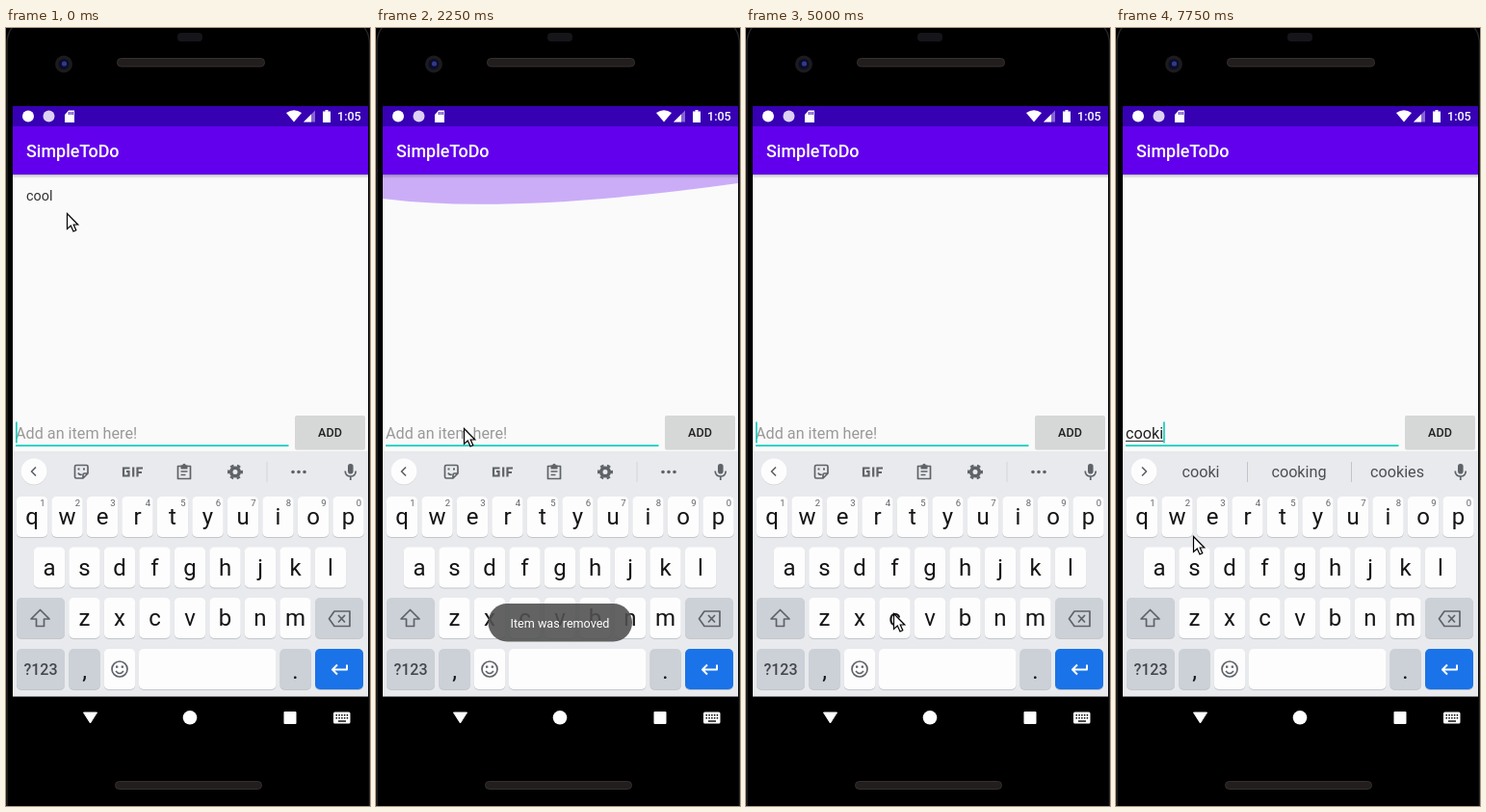
An HTML page that plays this animation: 378 px wide and 807 px high, repeating every 8 s.

```html
<!DOCTYPE html>
<html lang="en">
<head>
<meta charset="utf-8">
<title>To-do list</title>
<style>
html, body { margin: 0; width: 100%; height: 100%; overflow: hidden; background: #000; }
svg { display: block; width: 378px; height: 807px; font-family: Roboto, sans-serif; }
.mid { text-anchor: middle; }
.line { fill: none; stroke: #5f6368; stroke-width: 1.7; stroke-linejoin: round; }
.grey { fill: #5f6368; }
.key { font-size: 24px; fill: #151515; text-anchor: middle; }
.digit { font-size: 9.5px; fill: #5f6368; text-anchor: middle; }
.word { font-size: 16.2px; fill: #4c4f53; text-anchor: middle; }
#glow { transform-origin: 0 152px; }
</style>
</head>
<body>
<svg viewBox="0 0 378 807">
  <defs>
    <linearGradient id="shade" x2="0" y2="1">
      <stop stop-color="#000" stop-opacity=".24"/>
      <stop offset="1" stop-color="#000" stop-opacity="0"/>
    </linearGradient>
  </defs>

  <!-- phone body -->
  <rect width="378" height="807"/>
  <rect x="1" y="-12" width="376.5" height="850" rx="28" fill="none" stroke="#272727" stroke-width="1.4"/>
  <rect x="178" y="5" width="26" height="9" rx="4" fill="#15151a"/>
  <rect x="115.500" y="31.500" width="153" height="8.500" rx="4" fill="#211e1d" stroke="#35302e"/>
  <rect x="113.500" y="781.500" width="152" height="8" rx="4" fill="#211e1d" stroke="#35302e"/>
  <circle cx="60" cy="37.500" r="9" fill="#1b1b20"/>
  <circle cx="60" cy="37.500" r="5.500" fill="#0c0d25"/>
  <circle cx="60.500" cy="37" r="2.600" fill="#2d3a92"/>

  <!-- app -->
  <rect x="7" y="152" width="369" height="288" fill="#fafafa"/>
  <path id="glow" d="M7 152V177Q140 194 376 161V152Z" fill="#6200ee" fill-opacity=".31"/>
  <rect x="7" y="152" width="369" height="4" fill="url(#shade)"/>
  <rect x="7" y="81" width="369" height="21" fill="#3700b3"/>
  <rect x="7" y="102" width="369" height="50" fill="#6200ee"/>
  <text x="21" y="134" font-size="17.960" font-weight="500" fill="#fff">SimpleToDo</text>

  <!-- status bar -->
  <g fill="#fff">
    <circle cx="23" cy="91.500" r="6"/>
    <circle cx="44.500" cy="91.500" r="6" fill="#ddd2f4"/>
    <path d="M61 90L65 85.500H71V98H61Z"/>
    <path d="M65.500 87v3M67.500 87v3M69.500 87v3" stroke="#3700b3"/>
    <path d="M291 88Q299 82.500 307 88L299 97.500Z"/>
    <path d="M309 97.500L321 85.500V97.500Z" opacity=".4"/>
    <path d="M309 97.500L317 89.500V97.500Z"/>
    <path d="M329 86.500h2.500v-1.500h3v1.500H337V98H329Z"/>
    <text x="344" y="96.300" font-size="12.570" font-weight="500">1:05</text>
  </g>

  <text id="item" x="21" y="179.300" font-size="14.400" fill="#323232">cool</text>

  <!-- input row -->
  <text id="hint" x="10" y="426.300" font-size="16.200" fill="#999">Add an item here!</text>
  <text id="typed" x="10" y="426.300" font-size="16.200" fill="#222"></text>
  <rect id="under" x="10" y="428" height="1" fill="#333"/>
  <rect x="10" y="432.300" width="283.500" height="1.800" fill="#17cdbb"/>
  <rect id="caret" y="408.500" width="1.700" height="22" fill="#17cdbb"/>
  <rect x="300" y="403" width="73" height="34.800" rx="2" fill="#000" opacity=".13"/>
  <rect x="300" y="402" width="73" height="35" rx="2" fill="#d6d7d7"/>
  <text class="mid" x="336.500" y="424" font-size="12.570" font-weight="500" fill="#222">ADD</text>

  <!-- keyboard -->
  <rect x="7" y="439" width="369" height="254.500" fill="#e8eaed"/>
  <circle cx="29" cy="460.800" r="13.500" fill="#d2d4d7"/>
  <circle cx="29" cy="460" r="13.500" fill="#fdfdfd"/>
  <path id="chevron" class="line" d="M31 455.500L26.500 460L31 464.500"/>
  <g id="tools">
    <path class="line" d="M73 453.500H83.500Q85 453.500 85 455V462L80 467H73Q71.500 467 71.500 465.500V455Q71.500 453.500 73 453.500ZM85 462H81.500Q80 462 80 463.500V467M74.800 461.500Q76.500 464 78.700 463"/>
    <path class="grey" d="M74.500 456.500h2v2h-2zM80 456.500h2v2h-2z"/>
    <path class="line" stroke-width="2" style="stroke-width:2.200;stroke-linejoin:miter" d="M128.500 456.500H122V464.500H127.500V460H125M132.200 455.500V465.500M136.500 465.500V456.500H142M136.500 461H141"/>
    <path class="line" d="M178.500 454.500H191.500V467.500H178.500ZM181.500 460H188.500M181.500 463.500H186.500"/>
    <path class="grey" d="M181.500 453.500H183Q185 450 187 453.500H188.500V457.500H181.500Z"/>
    <circle class="line" cx="238" cy="460.500" r="4.300" style="stroke-width:3.600"/>
    <circle class="line" cx="238" cy="460.500" r="6.800" style="stroke-width:2.400" stroke-dasharray="3.560" stroke-dashoffset="1.780"/>
    <path d="M271 450V471" stroke="#d2d4d8"/>
    <g class="grey"><circle cx="298" cy="460.500" r="1.800"/><circle cx="304" cy="460.500" r="1.800"/><circle cx="310" cy="460.500" r="1.800"/></g>
  </g>
  <g id="words">
    <path d="M136.500 450V471M244.500 450V471" stroke="#c2c5c9"/>
    <text class="word" x="88" y="466.300"></text>
    <text class="word" x="190" y="466.300"></text>
    <text class="word" x="292" y="466.300"></text>
  </g>
  <rect class="grey" x="355" y="452" width="5.600" height="10.500" rx="2.800"/>
  <path class="line" d="M352.200 459.500Q352.500 465 357.800 465Q363 465 363.300 459.500M357.800 465V469"/>
  <g id="keys"></g>
  <path class="line" d="M35.500 603.500L26 613H31.500V620.500H39.500V613H45Z"/>
  <path class="line" d="M341 605H357V620.500H341L335.500 612.700ZM345 609L352 616.500M352 609L345 616.500"/>
  <circle class="line" cx="118" cy="665" r="8"/>
  <path class="line" d="M114 667Q118 672 122 667"/>
  <path class="grey" d="M114 661.500h2.300v2.300h-2.300zM119.700 661.500h2.300v2.300h-2.300z"/>
  <path class="line" style="stroke:#fff;stroke-width:2" d="M354 660.500V665.500H339.500M344 660.500L339 665.500L344 670.500"/>

  <!-- navigation -->
  <g fill="#fff">
    <path d="M80.500 710H94.500L87.500 721Z" stroke="#fff" stroke-linejoin="round"/>
    <circle cx="191" cy="715.300" r="7.300"/>
    <rect x="288.500" y="709" width="13" height="13" rx="1"/>
    <rect x="340" y="709.500" width="17.500" height="12" rx="1.500"/>
    <path d="M342.500 712.800H356M342.500 715.800H356" stroke="#000" stroke-width="1.500" stroke-dasharray="1.500 1.300"/>
    <path d="M345 719H353" stroke="#000" stroke-width="1.400"/>
  </g>

  <g id="toast">
    <rect x="116.500" y="597" width="149.500" height="39.500" rx="19.700" fill="#505050" fill-opacity=".89"/>
    <text class="mid" x="191" y="621.800" font-size="12.570" fill="#fff">Item was removed</text>
  </g>
  <path id="pointer" d="M.5 .5V16.500L4.300 13L7 19L9.800 17.800L7.200 12H11.800Z" fill="#fff" stroke="#000" stroke-width="1.200"/>
</svg>
<script>
const $ = id => document.getElementById(id);

// keyboard
let keys = "";
const cap = (x, y, w, fill = "#fdfdfd") => {
  keys += `<rect x="${x}" y="${y + 1}" width="${w}" height="42" rx="5" fill="#c3c6ca"/>
    <rect x="${x}" y="${y}" width="${w}" height="42" rx="5" fill="${fill}"/>`;
};
const label = (cls, x, y, text, more = "") => {
  keys += `<text class="${cls}" x="${x}" y="${y}" ${more}>${text}</text>`;
};
const pitch = 36.5, soft = "#ccd0d7";
[["qwertyuiop", 27, 486], ["asdfghjkl", 45, 538.5], ["zxcvbnm", 81.5, 591]].forEach(([row, x0, y], r) => {
  [...row].forEach((ch, i) => {
    const x = x0 + i * pitch;
    cap(x - 16.2, y, 32.4);
    label("key", x, y + 29, ch);
    if (!r) label("digit", x + 11, y + 10.3, (i + 1) % 10);
  });
});
cap(11, 591, 50, soft);
cap(321, 591, 50, soft);
cap(11, 644, 50, soft);
cap(65.3, 644, 32.4, soft);
cap(101.8, 644, 32.4);
cap(138, 644, 142.5);
cap(284.5, 644, 32.4, soft);
cap(321, 644, 50, "#1a73e8");
label("key", 36, 671, "?123", 'style="font-size:16px;font-weight:500;fill:#44474b"');
label("key", 81.5, 674.5, ",");
label("key", 300.5, 675, ".");
$("keys").innerHTML = keys;

// timelines: [start ms, value...]
const pointer = [
  [0, 63, 192], [250, 57, 187], [500, 49, 180], [750, 44, 176],
  [1750, 56, 215], [2000, 78, 340], [2250, 91, 415],
  [3250, 105, 465], [3500, 115, 502], [3750, 134, 560], [4000, 148, 598], [4250, 153, 607],
  [5500, 318, 514], [6500, 308, 545], [6750, 300, 571],
  [7000, 288, 540], [7250, 282, 514], [7500, 170, 525], [7750, 80, 527]
];
const item = [[0, 1], [1500, .58], [1750, 0]];
const toast = [[0, 0], [1500, .22], [1750, 1], [3750, .45], [4000, 0]];
const glow = [[0, 0, 1], [2000, .6, .6], [2250, 1, 1], [2500, .4, .7], [2750, 0, 1]];
const typing = [[0, ""], [5250, "c"], [5750, "co"], [6000, "coo"], [6750, "cook"], [7250, "cooki"]];
const guesses = {
  c: ["c", "can", "come"], co: ["co", "come", "could"], coo: ["coo", "cool", "caoo"],
  cook: ["cook", "cooking", "cookies"], cooki: ["cooki", "cooking", "cookies"]
};
const at = (line, t) => line.filter(p => p[0] <= t).pop().slice(1);
const wordTexts = $("words").querySelectorAll("text");

function draw(t) {
  const [x, y] = at(pointer, t);
  $("pointer").setAttribute("transform", `translate(${x} ${y})`);
  $("item").style.opacity = at(item, t)[0];
  $("toast").style.opacity = at(toast, t)[0];
  const [alpha, size] = at(glow, t);
  $("glow").style.opacity = alpha;
  $("glow").style.transform = `scaleY(${size})`;

  const [text] = at(typing, t);
  $("typed").textContent = text;
  const width = text ? $("typed").getComputedTextLength() : 0;
  $("under").setAttribute("width", width);
  $("caret").setAttribute("x", 10 + width);
  $("caret").style.opacity = text || (t + 750) % 1000 >= 500 ? 1 : 0;
  $("hint").style.opacity = text ? 0 : 1;

  const suggest = t >= 5500;
  $("tools").style.opacity = suggest ? 0 : 1;
  $("words").style.opacity = suggest ? 1 : 0;
  $("chevron").setAttribute("transform", `rotate(${suggest ? 180 : 0} 29 460)`);
  if (suggest) wordTexts.forEach((el, i) => {
    el.textContent = guesses[text][i];
    const bold = i === 1 && text === "coo";
    el.style.fontWeight = bold ? 700 : 400;
    el.style.fill = bold ? "#222" : "";
  });
}

const step = 250, loop = 8000, start = performance.now();
let shown = -1;
function tick() {
  const t = Math.floor((performance.now() - start) % loop / step) * step;
  if (t !== shown) draw(shown = t);
  requestAnimationFrame(tick);
}
tick();
</script>
</body>
</html>
```
